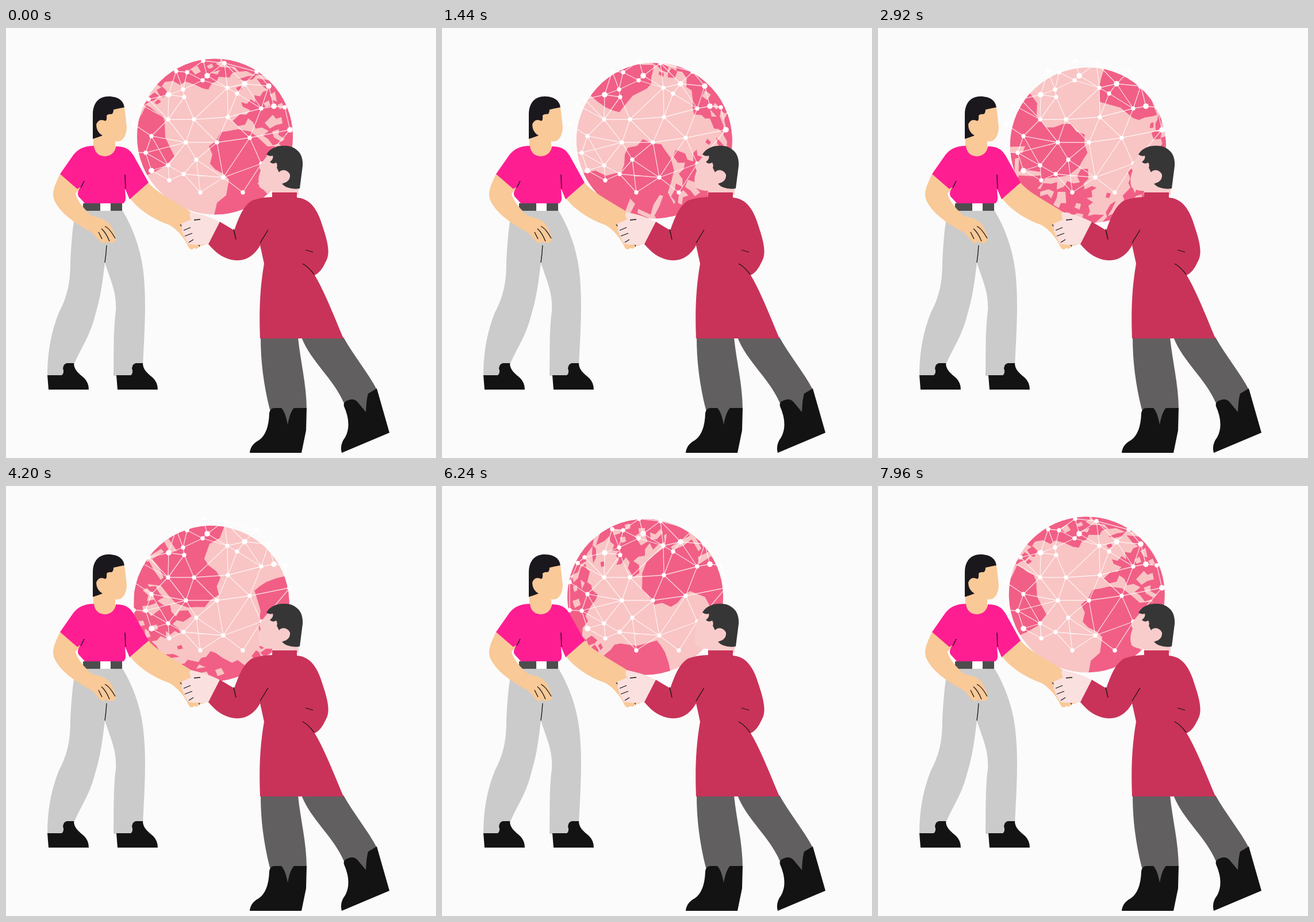
Write an HTML page that moves like this. It is 748x748 px and loops after 8000 ms.

```html
<!DOCTYPE html>
<html>
<head>
<meta charset="utf-8">
<style>
html, body { margin: 0; width: 100%; height: 100%; overflow: hidden; background: #fbfbfb; }
svg { display: block; width: 748px; height: 748px; }
.line { fill: none; stroke: #151515; stroke-width: 1.3; }
.land { fill: #f15f86; }
.sea { fill: #f9c4c4; }
.boot { fill: #131313; }
</style>
</head>
<body>
<svg viewBox="0 0 748 748">
  <defs>
    <clipPath id="disc"><circle cx="363.5" cy="189" r="135.5"/></clipPath>
    <path id="shoe" class="boot" d="M72 604H97Q102 600 99 592Q100 584 106 583H118C118 595 128 602 136 609Q144 617 144 629H74Z"/>
  </defs>

  <g id="globe" clip-path="url(#disc)">
    <circle class="sea" cx="363.5" cy="189" r="136"/>
    <g class="land">
      <!-- the Americas -->
      <path d="M244 134L251 138L262 147L272 152L276 162L277 190L285 207L293 223L285 232L275 241L259 250L240 258L218 230V180L236 150Z"/>
      <path d="M240 135L246 122L258 112L266 118L258 126L250 128ZM262 108L272 102L280 110L274 121L268 118ZM258 130L265 124L270 128L263 133Z"/>
      <path d="M262 98L280 72L310 50L372 48L373 58L365 62L374 68L392 69L401 76L393 79L389 86L370 85L366 93L358 96L352 107L342 105L330 99L312 93L303 99L290 92L276 94L270 103Z"/>
      <path d="M372 50L410 55L450 82L433 82L418 75L405 76L398 68L384 66Z"/>
      <path d="M404 89L420 84L435 82L430 89L415 92ZM400 104l8 -3l3 5l-7 4Z"/>
      <!-- Africa and the south -->
      <path d="M353 206L366 195L374 181L388 179L403 176L425 180L440 192L455 206L485 205L505 215L495 260L455 310L405 335L362 326L367 304L383 291L388 264L379 254L364 246L355 236L359 220Z"/>
      <!-- Europe and Asia -->
      <path d="M436 88L452 90L475 95L497 135L508 180L503 222L484 212L475 201L464 204L456 193L447 187L457 179L445 173L434 175L430 164L421 157L416 168L402 171L394 162L407 150L418 151L425 143L412 137L409 129L419 132L426 124L434 130L432 117L442 119L447 111L456 108L446 101Z"/>
    </g>
    <g class="sea">
      <path d="M322 72L333 66L339 76L329 81ZM356 78L372 73L368 81ZM349 66l9 -4l3 6l-8 3Z"/>
      <path d="M450 165L464 151L470 158L479 155L481 166L469 169L459 175ZM463 180L475 176L474 186L485 193L479 198L466 190Z"/>
      <path d="M459 116L468 111L471 128L464 125ZM448 131L457 126L460 135L452 138ZM472 134L480 130L484 139L476 141Z"/>
      <path d="M457 216L470 229L484 247L479 251L464 238L453 221ZM459 265L485 243L489 249L465 269ZM437 270L449 266L465 287L459 293Z"/>
    </g>
  </g>
  <g id="net" fill="#fff" stroke="#fff"></g>

  <!-- left figure -->
  <path fill="#cbcbcb" d="M122 318H203C225 355 237 395 240 435C244 480 241 530 238 587L215 605H187C188 570 186 530 191 492C193 460 182 440 172 408C167 450 164 470 155 500C145 540 125 565 118 587L102 605H72C72 565 78 530 92 495C108 465 112 440 112 405C114 370 116 340 122 318Z"/>
  <path class="line" d="M175 378Q174 394 172 408"/>
  <use href="#shoe"/>
  <use href="#shoe" x="120"/>
  <path fill="#4d4d4d" d="M134 305H202V318H134Z"/>
  <path fill="#fff" d="M164 305H182V318H164Z"/>
  <path fill="#1b181d" d="M151 193V150C151 130 162 119 178 119C197 119 206 128 206 141L190 162L168 188Z"/>
  <path fill="#f9c998" d="M206 138Q209 160 210 174Q209 190 200 196Q194 198 190 197V215Q172 236 152 212V193L168 187Q157 181 157 168Q161 157 171 161Q176 164 175 152Q179 149 183 150Q187 149 187 142Q195 140 206 138Z"/>
  <path fill="#f9c998" d="M94 254C84 275 80 285 83 297C92 322 125 343 150 356C156 363 163 372 169 375Q172 375 172 371L178 374L188 373Q193 370 190 362C185 345 178 335 165 331L150 327C135 315 122 297 121 288L129 279ZM248 269L216 297C235 320 260 334 285 343C300 352 312 368 318 382Q322 388 327 383L332 384L338 379L345 378V340L326 323C300 305 262 287 248 269Z"/>
  <path fill="#ff1e92" d="M153 205C135 205 125 211 117 221L94 254L124 280L129 277C124 286 124 290 127 294Q133 300 137 305H204Q209 302 208 293L207 279L215 298L248 269L222 222C215 211 208 206 191 206C189 228 155 230 153 205Z"/>
  <path class="line" d="M136 266Q133 273 130 278M207 255L208 280M161 355L167 367M166 349Q174 356 180 371M172 345Q180 348 190 366M303 342L308 347M334 375L337 380"/>

  <!-- right figure -->
  <path fill="#625f60" d="M443 538H508C512 580 523 620 523 664L490 692L459 664C448 620 443 580 443 538ZM514 538H587C605 570 630 600 645 629L627 670L588 653C570 610 530 580 514 538Z"/>
  <path class="boot" d="M458 670Q459 661 468 661H479Q486 668 490 690Q494 668 501 661H523L522 700L514 739H424Q425 725 440 717Q457 705 458 670ZM588 658Q586 651 594 648Q604 643 611 650L626 668Q627 645 630 636L645 627L667 704L584 739Q580 725 590 712Q602 690 588 658Z"/>
  <path fill="#f9cccc" d="M460 220L495 232L509 265V290H462L463 283Q450 284 441 277Q438 268 440 257L443 248Q440 244 441 239Q452 225 460 220Z"/>
  <path fill="#363636" d="M453 220C462 205 480 203 495 206C512 212 517 225 516 240L511 279Q490 282 480 271C488 269 495 265 494 255C490 246 479 245 475 251L471 243Q473 238 470 234Q464 238 459 233Q466 228 464 222Q458 224 453 220Z"/>
  <path fill="#fae0df" d="M354 376Q340 378 330 377L318 376Q312 370 308 358Q304 348 306 340L322 333Q317 325 321 320L345 326Q362 332 373 338Z"/>
  <path fill="#c93359" d="M463 286H506V295C535 297 545 325 553 352C562 380 563 395 556 407Q548 425 537 430C555 460 572 505 587 540H442C440 490 442 450 449 410L442 378C430 400 410 410 385 401C370 396 360 385 352 376L372 337L397 352C405 330 412 310 428 300Q445 294 463 294Z"/>
  <path class="line" d="M396 350L400 368M456 351L442 374M521 386L534 390M516 410Q527 416 536 429M309 352L321 347M311 362L324 357M318 373L326 368M327 334L338 333"/>
</svg>
<script>
const LOOP = 8000, STEP = 40;
const globe = document.getElementById('globe');

const small = [[296,75],[315,77],[343,57],[342,91],[380,61],[436,76],[385,104],[402,114],
  [308,107],[310,120],[248,124],[236,134],[282,159],[327,159],[386,155],[444,140],[485,138],
  [424,191],[253,188],[313,199],[367,199],[243,217],[331,229],[282,239],[284,265],[309,254],
  [378,260],[338,286],[444,236],[412,286],[222,167],[222,216]];
const large = [[350,83],[457,101],[415,97],[283,116],[466,136],[494,177],[253,248]];
const dots = [...small, ...large];
const dist2 = (a, b) => (a[0] - b[0]) ** 2 + (a[1] - b[1]) ** 2;

// Join two dots when no third dot lies between them.
let links = '';
dots.forEach((a, i) => dots.slice(i + 1).forEach(b => {
  const d = dist2(a, b);
  const blocked = dots.some(c => c !== a && c !== b && dist2(a, c) + dist2(b, c) < d * 0.85);
  if (d < 9000 && !blocked) links += `M${a}L${b}`;
}));
const circle = r => ([x, y]) => `<circle cx="${x}" cy="${y}" r="${r}" stroke="none"/>`;
document.getElementById('net').innerHTML =
  `<path d="${links}" fill="none" stroke-width="1.3" opacity=".75"/>` +
  small.map(circle(3.7)).join('') + large.map(circle(4.8)).join('');

const start = performance.now();
function draw() {
  const t = Math.max(0, performance.now() - start) % LOOP;
  const angle = Math.floor(t / STEP) * STEP / LOOP * 360;
  globe.setAttribute('transform', `rotate(${angle} 361 197)`);
  requestAnimationFrame(draw);
}
draw();
</script>
</body>
</html>
```
